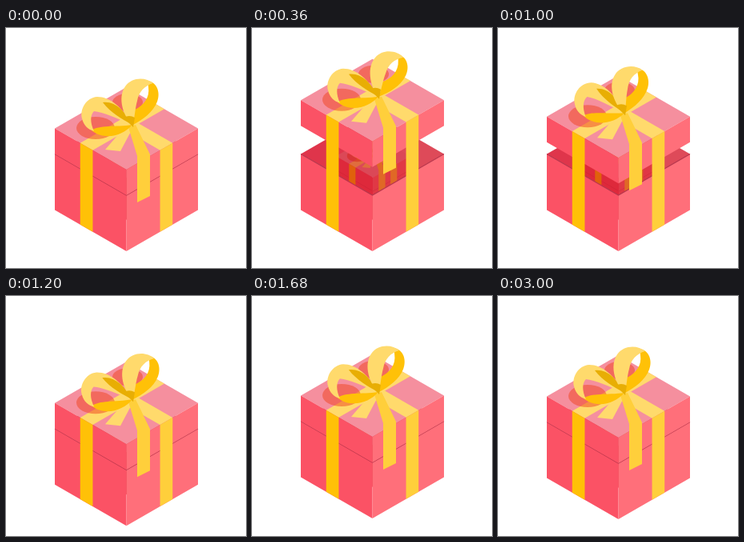
Recreate the animation shown at these times as an HTML page. Size 300x300 px, loop 3.04 s.

```html
<!DOCTYPE html>
<html lang="en">
<head>
<meta charset="utf-8">
<title>Gift box</title>
<style>
html, body { margin: 0; width: 100%; height: 100%; overflow: hidden; background: #fff; }
svg { display: block; width: 100vw; height: 100vh; }
</style>
</head>
<body>
<svg id="stage" viewBox="0 0 300 300"></svg>
<script>
(() => {
  const LOOP = 3040, STEP = 40;
  const LID = 32, HEIGHT = 102;       // depth of the lid and of the whole box
  const NEAR = .47, FAR = .645;       // edges of the ribbon along each side
  const PEAK = 580, LAND = 1050, RISE = 51.5;

  const bright = {
    top: '#f58f9e', left: '#fb5265', right: '#ff6f7a', seam: '#b9364c', shade: '#f0441f',
    gold: '#ffc107', band: '#ffcf3b', light: '#ffda6c', knot: '#e8ae04'
  };

  function darken(color) {
    const channel = i => parseInt(color.substr(1 + 2 * i, 2), 16);
    const mixed = [192, 0, 16].map((base, i) => Math.round((base + channel(i)) / 2));
    return `rgb(${mixed})`;
  }
  const dim = Object.fromEntries(
    Object.entries(bright).map(([name, color]) => [name, darken(color)]));

  function add(parent, tag, attrs = {}) {
    const node = document.createElementNS('http://www.w3.org/2000/svg', tag);
    for (const key in attrs) node.setAttribute(key, attrs[key]);
    parent.append(node);
    return node;
  }
  const group = (parent, attrs) => add(parent, 'g', attrs);
  const poly = (parent, points, fill) => add(parent, 'polygon', { points, fill });
  const path = (parent, d, fill) => add(parent, 'path', { d, fill });

  // u runs from the front corner to the right, v to the left, z downwards.
  const iso = (u, v, z = 0) => [150.5 + 89.5 * (u - v), 177 - 51.5 * (u + v) + z];
  const topQuad = (u0, u1, v0, v1) =>
    [iso(u0, v0), iso(u1, v0), iso(u1, v1), iso(u0, v1)].join(' ');
  const rightQuad = (u0, u1, z0, z1) =>
    [iso(u0, 0, z0), iso(u1, 0, z0), iso(u1, 0, z1), iso(u0, 0, z1)].join(' ');
  const leftQuad = (v0, v1, z0, z1) =>
    [iso(0, v0, z0), iso(0, v1, z0), iso(0, v1, z1), iso(0, v0, z1)].join(' ');

  function drawSides(g, c, z0, z1) {
    poly(g, leftQuad(0, 1, z0, z1), c.left);
    poly(g, rightQuad(0, 1, z0, z1), c.right);
  }

  function drawBody(g, c) {
    drawSides(g, c, LID, HEIGHT);
    add(g, 'polyline', {
      points: [iso(0, 1, LID), iso(0, 0, LID), iso(1, 0, LID)].join(' '),
      fill: 'none', stroke: c.seam, 'stroke-width': 1.2
    });
  }

  function drawLid(g, c) {
    poly(g, topQuad(0, 1, 0, 1), c.top);
    drawSides(g, c, 0, LID);
    poly(g, topQuad(0, 1, NEAR, FAR), c.light);
    poly(g, topQuad(NEAR, FAR, 0, FAR), c.light);
    const shade = group(g, { fill: c.shade, opacity: .5 });
    add(shade, 'ellipse', { cx: 112, cy: 125, rx: 24, ry: 14 });
    add(shade, 'ellipse', { cx: 152, cy: 93, rx: 19, ry: 11 });
  }

  function drawBands(g, c) {
    const left = poly(g, '', c.gold), right = poly(g, '', c.band);
    return lift => {
      left.setAttribute('points', leftQuad(NEAR, FAR, lift, HEIGHT));
      right.setAttribute('points', rightQuad(NEAR, FAR, lift, HEIGHT));
    };
  }

  function drawBow(g, c) {
    poly(g, '149,123 160,122 143,154 124,152', c.light);
    poly(g, '153,124 162,121 180,158 180,210 164,218 164,160', c.band);
    const left = group(g), right = group(g);
    path(left, 'M107 128C116 121 136 124 158 121C146 135 123 141 107 128Z', c.gold);
    path(left, 'M158 122C146 99 130 86 114 86C100 87 92 102 95 113' +
      'C97 122 103 127 110 129C105 118 105 109 110 104C121 105 140 113 158 122Z', c.light);
    path(left, 'M121 93C136 91 148 103 158 121C145 114 131 106 121 93Z', c.knot);
    path(right, 'M177 66C190 68 193 82 189 92C184 105 172 114 157 122' +
      'L161 102C172 97 180 87 178 74Z', c.gold);
    path(right, 'M158 122C143 105 141 84 149 73C157 61 175 61 184 69' +
      'C173 72 166 80 164 91C161 102 161 113 158 122Z', c.light);
    path(g, 'M147 112Q154 108 161 112L159 124Z', c.knot);
    return { left, right };
  }

  const stage = document.getElementById('stage');
  const box = group(stage);
  poly(box, topQuad(0, 1, 0, 1).length && [iso(0, 1, LID), iso(1, 1, LID), iso(0, 0, LID)].join(' '), '#df354b');
  poly(box, [iso(1, 1, LID), iso(1, 0, LID), iso(0, 0, LID)].join(' '), '#de4a59');

  const inner = group(box, { transform: 'translate(73 95) scale(.52)' });
  drawBody(inner, dim);
  drawLid(inner, dim);
  drawBands(inner, dim)(0);
  drawBow(inner, dim);

  drawBody(box, bright);
  const lid = group(box);
  drawLid(lid, bright);
  const stretchBands = drawBands(box, bright);
  const bowGroup = group(box);
  const bow = drawBow(bowGroup, bright);

  const ease = p => (1 - Math.cos(Math.PI * p)) / 2;

  function lidLift(t) {
    if (t < PEAK) return -RISE * ease(t / PEAK);
    if (t < LAND) return -RISE * (1 - ((t - PEAK) / (LAND - PEAK)) ** 3);
    return 0;
  }

  function bounce(t) {
    const s = Math.max(0, t - LAND);
    return 13 * Math.exp(-((s / 470) ** 2)) * Math.sin(Math.PI * s / 200);
  }

  // The loops lean out on the way up, whip in on the fall, then settle.
  function sway(t, lean, whip) {
    if (t < PEAK) return lean * ease(t / PEAK);
    if (t < LAND) return lean + (whip - lean) * ease((t - PEAK) / (LAND - PEAK));
    const s = t - LAND;
    return whip * Math.exp(-s / 220) * Math.cos(Math.PI * s / 200);
  }

  function render(now) {
    const t = Math.floor((now % LOOP) / STEP) * STEP;
    const lift = lidLift(t), shift = `translate(0 ${lift})`;
    box.setAttribute('transform', `translate(0 ${bounce(t)})`);
    lid.setAttribute('transform', shift);
    bowGroup.setAttribute('transform', shift);
    stretchBands(lift);
    bow.left.setAttribute('transform', `rotate(${sway(t, 0, 4)} 158 122)`);
    bow.right.setAttribute('transform', `rotate(${sway(t, 8.5, -4)} 158 122)`);
  }

  let start;
  function tick(now) {
    start ??= now;
    render(now - start);
    requestAnimationFrame(tick);
  }
  render(0);
  requestAnimationFrame(tick);
})();
</script>
</body>
</html>
```
